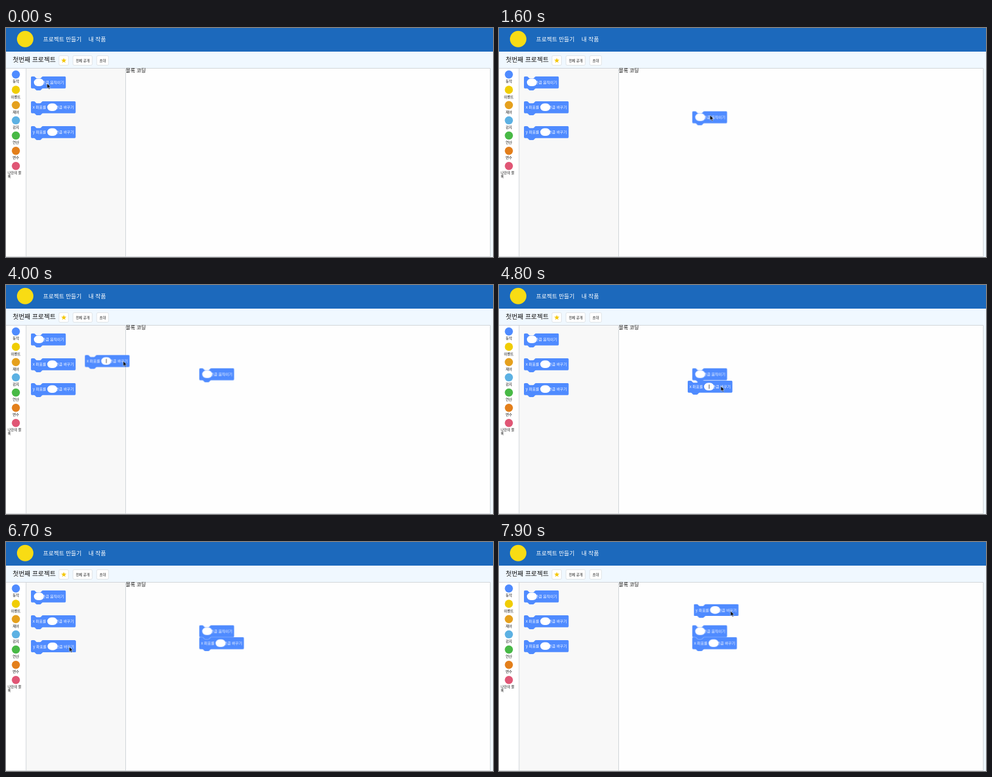
Write an HTML page that moves like this. It is 800 px wide and 378 px high and loops after 8000 ms.

```html
<!DOCTYPE html>
<html lang="ko">
<head>
<meta charset="utf-8">
<title>블록 코딩</title>
<style>
html, body { margin: 0; width: 100%; height: 100%; overflow: hidden; background: #f0f8ff; }
svg { display: block; width: 100%; height: 100%; }
text { font-family: "Noto Sans CJK KR", "Noto Sans CJK", "Noto Sans", sans-serif; font-weight: 500; fill: #111; }
.nav text { font-size: 9.4px; fill: #fff; }
.title { font-size: 10.5px; }
.heading { font-size: 8.3px; }
.small text { font-size: 5.7px; }
.middle { text-anchor: middle; }
.buttons rect { fill: #fff; stroke: #d4d8dc; stroke-width: .7; }
.label { font-size: 6.2px; fill: #fff; }
.end { text-anchor: end; }
.body { fill: #4f8bff; }
.slot { fill: #fff; }
.caret { stroke: #222; stroke-width: .8; }
.lines { fill: none; stroke: #cfd3d7; stroke-width: 1; }

/* One 8 s loop: 1% is 80 ms */
.run { animation: 8s linear infinite; }
.move-copy { animation-name: move-copy; }
.x-copy { animation-name: x-copy; }
.y-copy { animation-name: y-copy; }
.cursor { animation-name: cursor; }
.arrow { animation-name: arrow; }
.beam { animation-name: beam; }
.typing { animation-name: typing; }
.carried { animation-name: carried; }

@keyframes move-copy {
  0%, 1.25% { transform: translate(41px, 80px); opacity: 0; }
  1.26% { transform: translate(41px, 80px); opacity: 1; animation-timing-function: ease-in-out; }
  8.75% { transform: translate(317px, 137px); }
  11.25%, 100% { transform: translate(317.5px, 137.5px); opacity: 1; }
}
@keyframes x-copy {
  0%, 44.99% { transform: translate(41px, 121px); opacity: 0; }
  45% { transform: translate(41px, 121px); opacity: 1; animation-timing-function: ease-in; }
  50% { transform: translate(129px, 115.5px); animation-timing-function: ease-out; }
  56.25% { transform: translate(303.5px, 154px); }
  60%, 62.49% { transform: translate(310px, 158px); }
  62.5%, 100% { transform: translate(317.5px, 157.2px); opacity: 1; }
}
@keyframes y-copy {
  0%, 82.49% { transform: translate(41.5px, 162.4px); opacity: 0; }
  82.5% { opacity: 1; }
  83.75%, 86.25% { transform: translate(41.5px, 162.4px); animation-timing-function: ease-in; }
  90% { transform: translate(69px, 122px); animation-timing-function: ease-out; }
  98.75%, 100% { transform: translate(320px, 102.4px); opacity: 1; }
}
@keyframes cursor {
  0% { transform: translate(67.5px, 91.5px); }
  1.25% { transform: translate(67.5px, 91.5px); animation-timing-function: ease-in-out; }
  8.75% { transform: translate(344px, 148.7px); }
  11.25%, 16% { transform: translate(344.5px, 149px); }
  22.5% { transform: translate(348px, 141px); animation-timing-function: ease-in-out; }
  32.5% { transform: translate(79px, 131px); }
  36.25% { transform: translate(79px, 131px); animation-timing-function: ease-in-out; }
  42.5% { transform: translate(104px, 131px); }
  45% { transform: translate(104px, 131px); animation-timing-function: ease-in; }
  50% { transform: translate(192px, 125.5px); animation-timing-function: ease-out; }
  56.25% { transform: translate(363px, 163.5px); }
  60%, 67.5% { transform: translate(364.5px, 167px); }
  78.75% { transform: translate(348px, 175px); animation-timing-function: ease-in-out; }
  83.75% { transform: translate(104px, 173px); }
  86.25% { transform: translate(104px, 173px); animation-timing-function: ease-in; }
  90% { transform: translate(131px, 133px); animation-timing-function: ease-out; }
  98.75%, 100% { transform: translate(380.5px, 114px); }
}
@keyframes arrow {
  0%, 31.49%, 38.5%, 100% { opacity: 1; }
  31.5%, 38.49% { opacity: 0; }
}
@keyframes beam {
  0%, 31.49%, 38.5%, 100% { opacity: 0; }
  31.5%, 38.49% { opacity: 1; }
}
@keyframes typing {
  0%, 32.49%, 45%, 100% { opacity: 0; }
  32.5%, 44.99% { opacity: 1; }
}
@keyframes carried {
  0%, 62.49% { opacity: 1; }
  62.5%, 100% { opacity: 0; }
}
</style>
</head>
<body>
<svg viewBox="0 0 800 378">
  <defs>
    <g id="move">
      <path class="body" d="M0 1.6Q0 0 1.6 0H4.9C5.7 0 6.2.4 6.6.8L8.2 2.5C8.6 2.9 9 3.3 9.8 3.3H14.8C15.6 3.3 16 2.9 16.4 2.5L18 .8C18.4.4 18.9 0 19.7 0H55.6Q57.2 0 57.2 1.6V18.1Q57.2 19.7 55.6 19.7H19.7C18.9 19.7 18.4 20.1 18 20.5L16.4 22.2C16 22.6 15.6 23 14.8 23H9.8C9 23 8.6 22.6 8.2 22.2L6.6 20.5C6.2 20.1 5.7 19.7 4.9 19.7H1.6Q0 19.7 0 18.1Z"/>
      <text class="label end" x="54.2" y="12.2">만큼 움직이기</text>
      <rect class="slot" x="4.8" y="3.6" width="16.4" height="12.4" rx="6.6"/>
    </g>
    <g id="change">
      <path class="body" d="M0 1.6Q0 0 1.6 0H4.9C5.7 0 6.2.4 6.6.8L8.2 2.5C8.6 2.9 9 3.3 9.8 3.3H14.8C15.6 3.3 16 2.9 16.4 2.5L18 .8C18.4.4 18.9 0 19.7 0H71.8Q73.4 0 73.4 1.6V18.1Q73.4 19.7 71.8 19.7H19.7C18.9 19.7 18.4 20.1 18 20.5L16.4 22.2C16 22.6 15.6 23 14.8 23H9.8C9 23 8.6 22.6 8.2 22.2L6.6 20.5C6.2 20.1 5.7 19.7 4.9 19.7H1.6Q0 19.7 0 18.1Z"/>
      <text class="label end" x="70.5" y="12.2">만큼 바꾸기</text>
      <rect class="slot" x="26.8" y="3.6" width="16.4" height="12.4" rx="6.6"/>
    </g>
    <g id="change-x"><use href="#change"/><text class="label" x="3" y="12.2">x 좌표를</text></g>
    <g id="change-y"><use href="#change"/><text class="label" x="3" y="12.2">y 좌표를</text></g>
    <path id="caret" class="caret" d="M35.2 6.3V13.3"/>
  </defs>

  <rect width="800" height="378" fill="#f0f8ff"/>
  <rect width="800" height="39" fill="#1c69bc"/>
  <circle cx="31.5" cy="18.3" r="13.5" fill="#f8dc14"/>
  <g class="nav">
    <text x="61" y="22">프로젝트 만들기</text>
    <text x="135.6" y="22">내 작품</text>
  </g>

  <text class="title" x="11" y="56.4">첫번째 프로젝트</text>
  <g class="buttons small middle">
    <rect x="87" y="45.7" width="15.6" height="15.8" rx="2"/>
    <path fill="#f4c80e" d="M95 49.4L96.2 52.3L99.3 52.5L96.9 54.5L97.7 57.5L95 55.8L92.3 57.5L93.1 54.5L90.7 52.5L93.8 52.3Z"/>
    <rect x="110" y="45.7" width="31.6" height="15.8" rx="2"/>
    <text x="125.9" y="55.9">전체 공개</text>
    <rect x="149" y="45.7" width="19.4" height="15.8" rx="2"/>
    <text x="158.8" y="55.9">초대</text>
  </g>

  <rect y="67" width="33" height="311" fill="#fff"/>
  <rect x="33" y="67" width="163" height="311" fill="#f8f8f8"/>
  <rect x="197" y="67" width="598" height="311" fill="#fefefe"/>
  <path class="lines" d="M0 66.5H795.5V377.5H0M33 67V378M196.5 67V378"/>

  <g class="small middle">
    <circle cx="16.2" cy="76.8" r="6.7" fill="#4f8bff"/><text x="16.2" y="90.4">동작</text>
    <circle cx="16.2" cy="102" r="6.7" fill="#f0cd04"/><text x="16.2" y="115.6">이벤트</text>
    <circle cx="16.2" cy="127.2" r="6.7" fill="#e5a01d"/><text x="16.2" y="140.7">제어</text>
    <circle cx="16.2" cy="152.4" r="6.7" fill="#5cb1e3"/><text x="16.2" y="165.9">감지</text>
    <circle cx="16.2" cy="177.5" r="6.7" fill="#48b946"/><text x="16.2" y="191">연산</text>
    <circle cx="16.2" cy="202.7" r="6.7" fill="#e37f1b"/><text x="16.2" y="216.2">변수</text>
    <circle cx="16.2" cy="227.8" r="6.7" fill="#e05675"/>
  </g>
  <g class="small">
    <text x="2.8" y="241.4">나만의 블</text>
    <text x="2.8" y="247.3">록</text>
  </g>

  <text class="heading" x="196.8" y="73.4">블록 코딩</text>

  <use href="#move" x="41" y="80"/>
  <use href="#change-x" x="41" y="121"/>
  <use href="#caret" class="run typing" x="41" y="121"/>
  <use href="#change-y" x="41" y="162"/>

  <g class="run move-copy"><use href="#move"/></g>
  <g class="run x-copy">
    <use href="#change-x"/>
    <use href="#caret" class="run carried"/>
  </g>
  <g class="run y-copy"><use href="#change-y"/></g>

  <g class="run cursor">
    <path class="run arrow" d="M0 0V8.2L1.9 6.4L3.2 9.4L4.5 8.8L3.2 5.9H5.8Z" stroke="#fff" stroke-width=".5"/>
    <path class="run beam" d="M-1.8 -4.2Q0 -4.2 0 -3.2Q0 -4.2 1.8 -4.2M0 -3.2V3.2M-1.8 4.2Q0 4.2 0 3.2Q0 4.2 1.8 4.2M-1 .8H1" fill="none" stroke="#111" stroke-width=".9"/>
  </g>
</svg>
</body>
</html>
```
